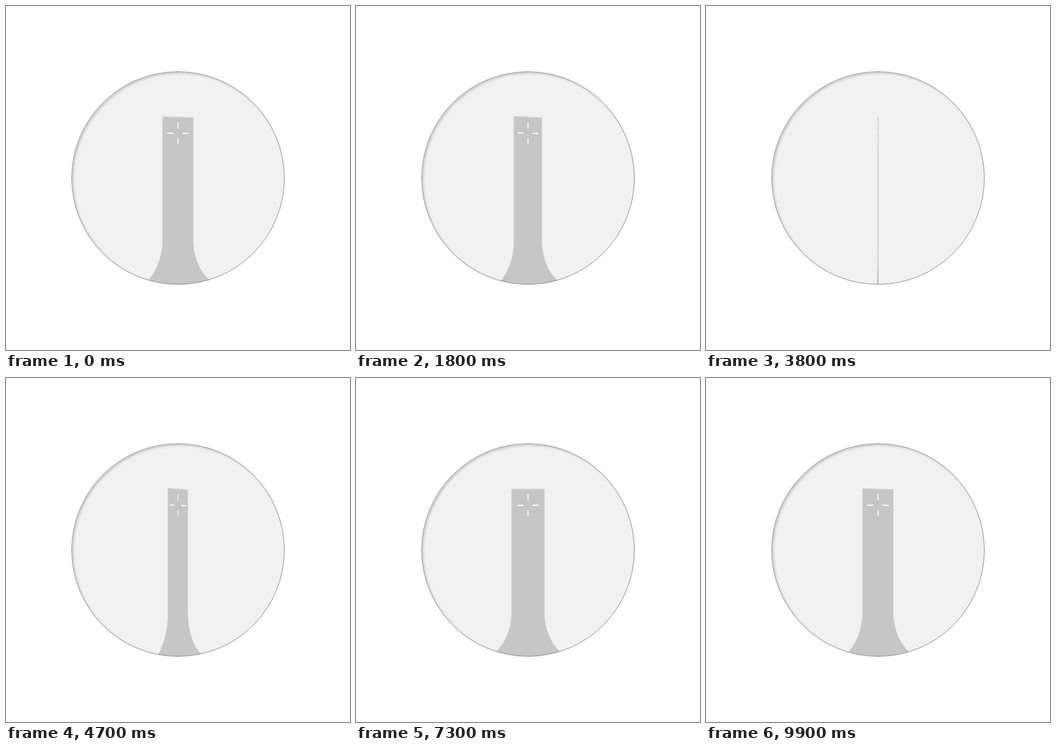
Animation, 600 px wide and 600 px high, one loop 10 s. Source, as an HTML page with a canvas:

```html
<!DOCTYPE html>
<html>
<head>
<meta charset="utf-8">
<style>
  html, body { margin: 0; width: 100%; height: 100%; overflow: hidden; background: #fff; }
  #disc {
    position: absolute; left: 114.5px; top: 114.5px; width: 371px; height: 371px;
    border-radius: 50%; background: #f1f1f1;
    box-shadow: inset 2px 2px 4px rgba(0, 0, 0, .2);
  }
  canvas { position: absolute; left: 0; top: 0; }
</style>
</head>
<body>
<div id="disc"></div>
<canvas id="stage" width="600" height="600"></canvas>
<script>
const ctx = document.getElementById('stage').getContext('2d');
const LOOP = 10000, STEP = 100, MID = 300, RADIUS = 185.5, DEPTH = 1420;
const MARK_LAG = 12;

// [seconds, turn in degrees]
const turns = [[0, 20], [1.8, -328.5], [3, -614], [4.7, -1027.5],
               [6.3, -1405.5], [8.2, -1813], [9.9, -2140]];

function angleAt(s) {
  let i = 1;
  while (i < turns.length - 1 && s > turns[i][0]) i++;
  const [t0, a0] = turns[i - 1], [t1, a1] = turns[i];
  return a0 + (a1 - a0) * (s - t0) / (t1 - t0);
}

// Turns a flat point about the vertical axis, seen in perspective.
function projector(degrees) {
  const a = degrees * Math.PI / 180, c = Math.cos(a), s = Math.sin(a);
  return (x, y) => {
    const p = DEPTH / (DEPTH + x * s);
    return [MID + x * c * p, MID + (y - MID) * p];
  };
}

function drawStand(at) {
  ctx.fillStyle = '#c6c6c6';
  ctx.beginPath();
  ctx.moveTo(...at(-28.75, 193.4));
  ctx.lineTo(...at(28.75, 193.4));
  ctx.lineTo(...at(28.75, 411));
  ctx.bezierCurveTo(...at(29.5, 440), ...at(42, 478), ...at(84, 496));
  ctx.lineTo(...at(84, 530));
  ctx.lineTo(...at(-84, 530));
  ctx.lineTo(...at(-84, 496));
  ctx.bezierCurveTo(...at(-42, 478), ...at(-29.5, 440), ...at(-28.75, 411));
  ctx.fill();
}

function drawBar(at, x0, y0, x1, y1) {
  ctx.beginPath();
  ctx.moveTo(...at(x0, y0));
  ctx.lineTo(...at(x1, y0));
  ctx.lineTo(...at(x1, y1));
  ctx.lineTo(...at(x0, y1));
  ctx.fill();
}

function drawMark(at) {
  ctx.fillStyle = '#fff';
  drawBar(at, -19, 221, -8, 223);
  drawBar(at, 8, 221, 19, 223);
  drawBar(at, -0.9, 203, 0.9, 213.5);
  drawBar(at, -0.9, 230.5, 0.9, 241);
}

function circle() {
  ctx.beginPath();
  ctx.arc(MID, MID, RADIUS, 0, 2 * Math.PI);
}

function frame() {
  const ms = performance.now() % LOOP;
  const angle = angleAt(Math.floor(ms / STEP) * STEP / 1000);
  ctx.clearRect(0, 0, 600, 600);
  ctx.save();
  circle();
  ctx.clip();
  drawStand(projector(angle));
  drawMark(projector(angle - MARK_LAG));
  ctx.restore();
  circle();
  ctx.lineWidth = 0.8;
  ctx.strokeStyle = '#777';
  ctx.stroke();
  requestAnimationFrame(frame);
}
frame();
</script>
</body>
</html>
```
